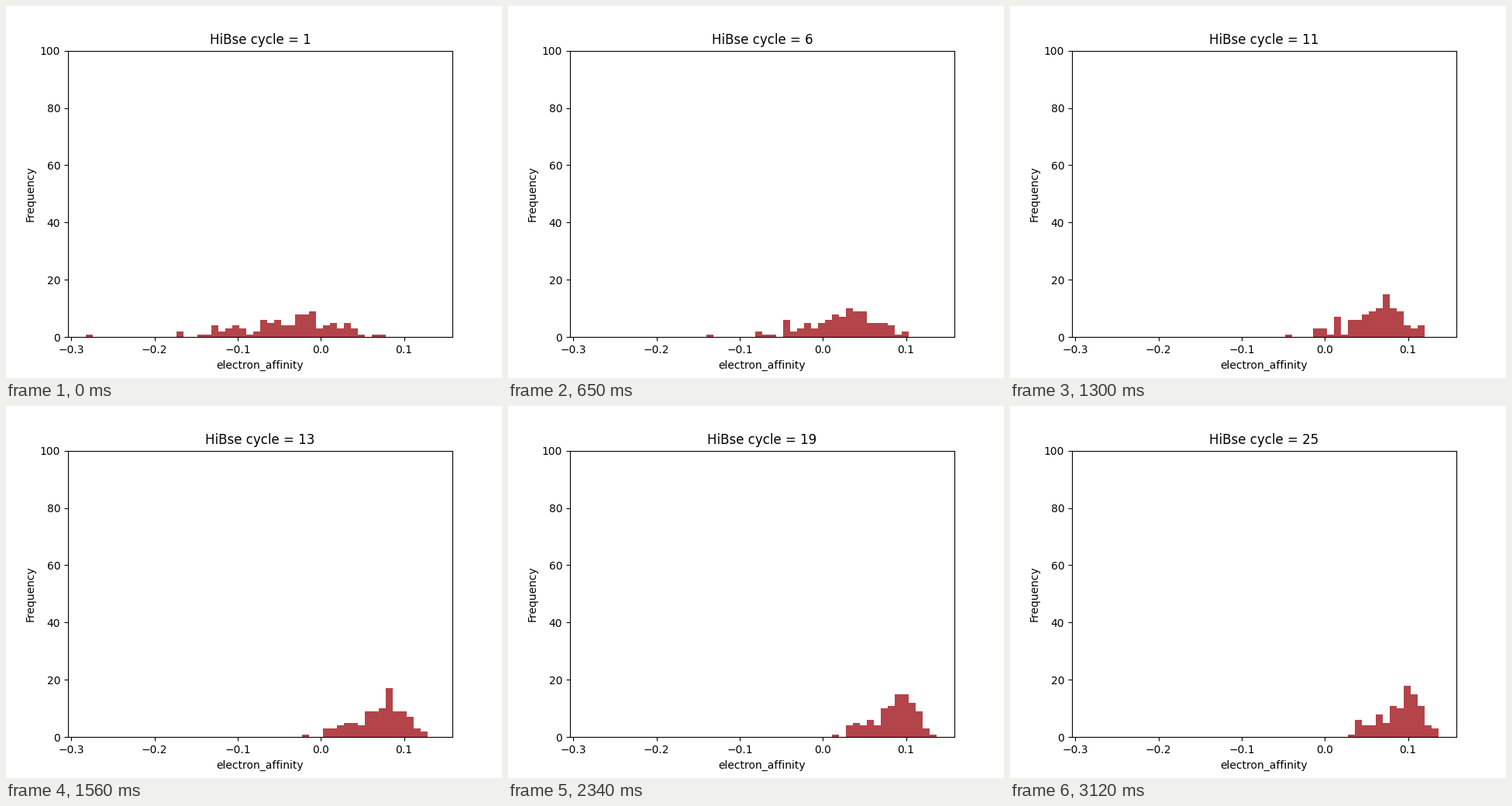
Write a matplotlib script that moves like this. It is 640 px wide and 480 px high and loops after 3250 ms.

```python
import numpy as np
import matplotlib.pyplot as plt
from matplotlib.animation import FuncAnimation

plt.rcParams["font.family"] = "DejaVu Sans"

CYCLES = 25
STEP_MS = 130
BINS = 50
SAMPLES = 100
LOW, HIGH = -0.2829, 0.1372
BAR_COLOR = "#b3444a"

# Percentiles of the population, in bin units, at the first and last cycle
PERCENTS = [0, 1, 5, 25, 50, 75, 95, 100]
START = np.array([0, 13, 18, 25, 30.1, 33.1, 38.5, 42])
END = np.array([38, 38.5, 39.4, 43.1, 45.4, 46.7, 48.4, 49.7])


def histogram(cycle):
    """Counts per bin of a population that settles towards its final shape."""
    rest = np.exp(-((cycle - 1) / 7.5) ** 1.2)
    percentiles = END + (START - END) * rest
    ranks = np.linspace(0, 100, SAMPLES)
    ranks[1:-1] += np.random.default_rng(cycle).uniform(-3, 3, SAMPLES - 2)
    ranks[1:-1] = ranks[1:-1].clip(1, 99)
    positions = np.interp(ranks, PERCENTS, percentiles)
    return np.bincount(positions.astype(int), minlength=BINS)


fig, ax = plt.subplots(figsize=(6.4, 4.8), dpi=100)
edges = np.linspace(LOW, HIGH, BINS + 1)
bars = ax.bar(edges[:-1], np.zeros(BINS), width=np.diff(edges),
              align="edge", color=BAR_COLOR)
margin = 0.05 * (HIGH - LOW)
ax.set_xlim(LOW - margin, HIGH + margin)
ax.set_ylim(0, 100)
ax.set_xticks([-0.3, -0.2, -0.1, 0.0, 0.1])
ax.set_yticks(range(0, 101, 20))
ax.set_xlabel("electron_affinity")
ax.set_ylabel("Frequency")
title = ax.set_title("")


def update(frame):
    cycle = frame + 1
    for bar, count in zip(bars, histogram(cycle)):
        bar.set_height(count)
    title.set_text(f"HiBse cycle = {cycle}")
    return [*bars, title]


anim = FuncAnimation(fig, update, frames=CYCLES, interval=STEP_MS,
                     repeat=True, repeat_delay=0, blit=False)
plt.show()
```
